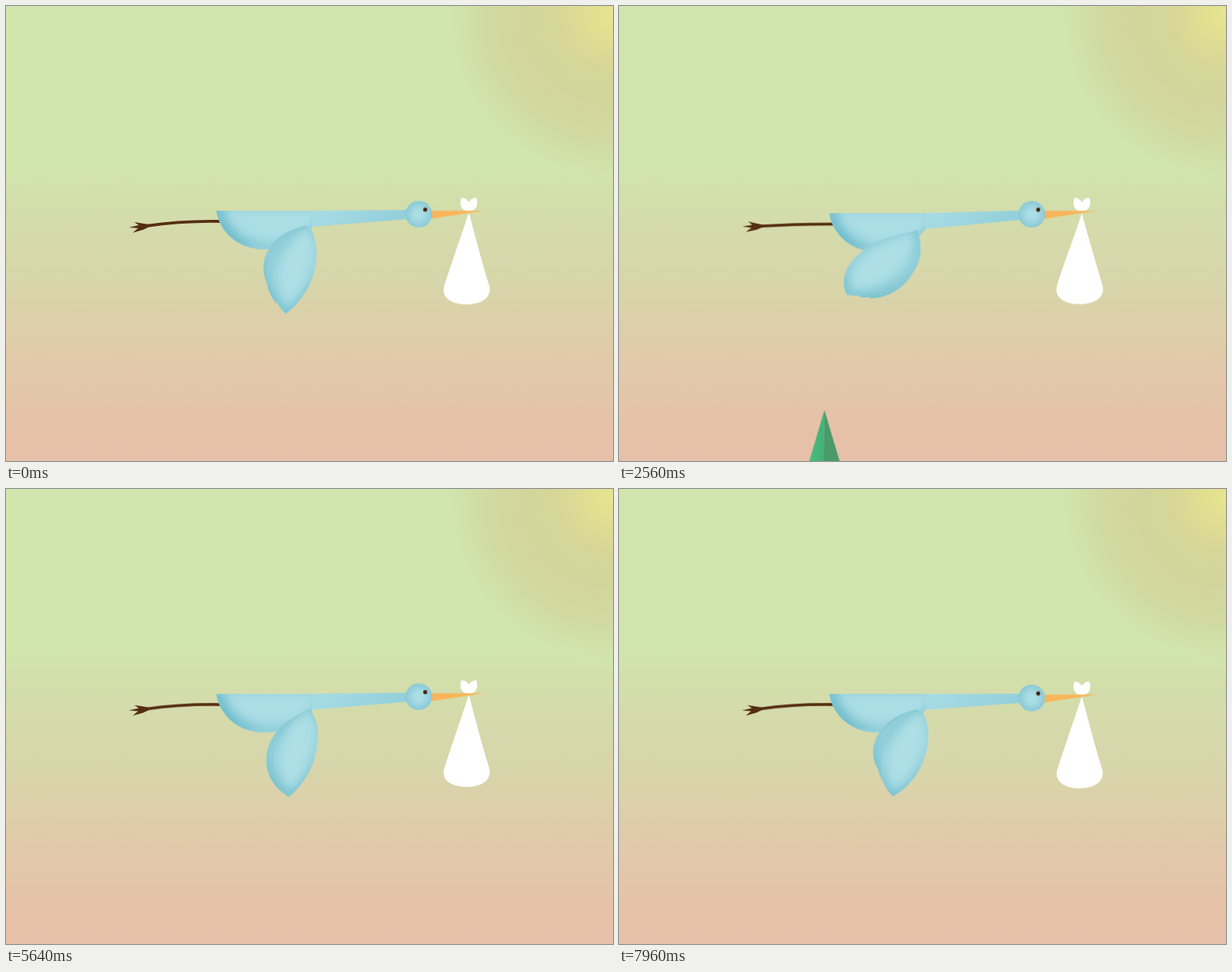
An HTML page that plays this animation: 800x600 px, repeating every 8 s.

```html
<!DOCTYPE html>
<html lang="en">
<head>
<meta charset="utf-8">
<title>Stork</title>
<style>
html, body { margin: 0; width: 100%; height: 100%; overflow: hidden; }
body {
  background:
    radial-gradient(circle at 798px 12px, #e6e58e 0, #dfdc93 40px, #d6d698 72px,
      #d3d59b 110px, #d1daa2 165px, rgba(208,230,172,0) 215px),
    linear-gradient(#d0e6ad 0 35%, #d3deab 43%, #d8d5aa 62%, #e0cba9 76%, #e6c1a8 94%, #e6c0a8);
}
svg { display: block; width: 800px; height: 600px; }

.trees { animation: scroll 8s linear infinite; }
@keyframes scroll { to { transform: translateX(-4368px); } }

/* half a wing beat each way */
.body, .head, .neck, .leg, .foot {
  animation: 400ms cubic-bezier(.37,0,.63,1) infinite alternate;
}
.body { animation-name: bob; }
.head { animation-name: nod; animation-delay: -720ms; }
.neck { animation-name: tilt; animation-delay: -200ms; }
.leg  { animation-name: bend; }
.foot { animation-name: kick; }
@keyframes bob  { to { transform: translateY(9.2px); } }
@keyframes nod  { from { transform: translateY(273.6px); } to { transform: translateY(283.6px); } }
@keyframes tilt { from { transform: skewY(1deg); } to { transform: skewY(-1deg); } }
@keyframes bend {
  from { d: path("M285 284Q232 283 185 290"); }
  to   { d: path("M285 285Q232 286 187 282"); }
}
@keyframes kick { to { transform: translate(2px,-8px) rotate(11deg); } }

.sack { animation: sway 800ms ease-in-out infinite; }
@keyframes sway {
  0%, 10%, 80%, 100% { d: path("M610-2C599 30 588 63 578 93C572 110 588 119 607 119C626 119 642 110 636.5 93C627 63 619 30 610-2Z"); }
  45%, 52% { d: path("M610-1C604 35 576 75 575 95C574 108 587 116 607 116C628 116 641 108 640 95C640 78 617 40 610-1Z"); }
}

.feather { animation: leaf 800ms linear infinite; filter: url(#tipShade); }
@keyframes leaf {
  0%, 10%, 100% { d: path("M13.5-15.5C27-27 47-32 69-30C90-28 113-19 132 0C122 15 102 25 80 24C57 23 33 12 13.5-15.5Z"); }
  36%, 54% { d: path("M13.5-13C40-45 60-48 78-47C108-46 136-28 136-3C136 16 122 22 108 20C85 18 55 10 13.5-13Z"); }
}
.front, .mid, .back { animation: 800ms linear infinite; }
.front { animation-name: front; fill: #aedfe6; }
.mid   { animation-name: mid; fill: #9fd6e0; }
.back  { animation-name: back; fill: #98d2dc; }
@keyframes front {
  0%, 100% { transform: rotate(97.5deg); }
  5%  { transform: rotate(96deg); }
  10% { transform: rotate(96.5deg); }
  18% { transform: rotate(118deg); }
  27% { transform: rotate(170deg); }
  36% { transform: rotate(218deg); }
  39% { transform: rotate(221deg); }
  45% { transform: rotate(203deg); }
  50% { transform: rotate(183deg); }
  60% { transform: rotate(153deg); }
  72% { transform: rotate(126deg); }
  85% { transform: rotate(107deg); }
  95% { transform: rotate(101deg); }
}
@keyframes mid {
  0%, 100% { transform: rotate(104.5deg) scale(.91,.95); }
  5%  { transform: rotate(99deg) scale(.97,1.05); }
  10% { transform: rotate(97deg) scale(.97,1.05); }
  18% { transform: rotate(112deg) scale(.95,1); }
  27% { transform: rotate(160deg) scale(.92,.95); }
  36% { transform: rotate(214deg) scale(.9); }
  40% { transform: rotate(227deg) scale(.9); }
  45% { transform: rotate(214deg) scale(.9); }
  50% { transform: rotate(192deg) scale(.89); }
  60% { transform: rotate(162deg) scale(.88); }
  72% { transform: rotate(134deg) scale(.88); }
  85% { transform: rotate(113deg) scale(.88); }
  95% { transform: rotate(107deg) scale(.9); }
}
@keyframes back {
  0%, 100% { transform: rotate(111deg) scale(.79,.9); }
  5%  { transform: rotate(101deg) scale(.95,1.15); }
  10% { transform: rotate(98deg) scale(.95,1.1); }
  18% { transform: rotate(108deg) scale(.92,1); }
  27% { transform: rotate(150deg) scale(.85,.9); }
  36% { transform: rotate(212deg) scale(.78); }
  41% { transform: rotate(234deg) scale(.78); }
  45% { transform: rotate(226deg) scale(.75); }
  50% { transform: rotate(203deg) scale(.73); }
  60% { transform: rotate(172deg) scale(.74); }
  72% { transform: rotate(143deg) scale(.74); }
  85% { transform: rotate(121deg) scale(.75); }
  95% { transform: rotate(115deg) scale(.79,.85); }
}
</style>
</head>
<body>
<svg viewBox="0 0 800 600">
  <defs>
    <filter id="tipShade" color-interpolation-filters="sRGB">
      <feFlood flood-color="#6fbccb"/>
      <feComposite operator="out" in2="SourceAlpha"/>
      <feGaussianBlur stdDeviation="8"/>
      <feOffset dx="-5" dy="-1"/>
      <feComposite operator="in" in2="SourceAlpha" result="shade"/>
      <feMerge><feMergeNode in="SourceGraphic"/><feMergeNode in="shade"/></feMerge>
    </filter>
    <filter id="bellyShade" color-interpolation-filters="sRGB">
      <feFlood flood-color="#6fbccb"/>
      <feComposite operator="out" in2="SourceAlpha"/>
      <feGaussianBlur stdDeviation="7"/>
      <feOffset dx="8" dy="-6"/>
      <feComposite operator="in" in2="SourceAlpha" result="shade"/>
      <feMerge><feMergeNode in="SourceGraphic"/><feMergeNode in="shade"/></feMerge>
    </filter>
    <linearGradient id="neckFill" x2="1" y2=".15">
      <stop stop-color="#abdde5"/><stop offset="1" stop-color="#92cfdb"/>
    </linearGradient>
    <radialGradient id="headFill">
      <stop offset=".3" stop-color="#abdde5"/><stop offset="1" stop-color="#8acad7"/>
    </radialGradient>
    <linearGradient id="treeFill">
      <stop stop-color="#50c586"/><stop offset="1" stop-color="#42b276"/>
    </linearGradient>
    <g id="tree">
      <path d="M0 0L-36.7 123H-2Z" fill="url(#treeFill)"/>
      <path d="M0 0L-2 123H36.7Z" fill="#4a9a6a"/>
    </g>
  </defs>

  <g class="trees">
    <use href="#tree" x="1022" y="477"/>
    <use href="#tree" x="1669" y="533"/>
    <use href="#tree" x="2878" y="477"/>
    <use href="#tree" x="4101" y="533"/>
  </g>

  <g class="body">
    <path class="leg" d="M285 284Q232 283 185 290" fill="none" stroke="#552d12" stroke-width="3.8"/>
    <g transform="translate(187 290)">
      <path class="foot" d="M1-2L-18-5L-12-1L-25 2L-13 3L-20 9L-6 5L1 1.500Z" fill="#552d12"/>
    </g>
    <g transform="translate(390 270)">
      <path class="neck" d="M2 0L140-1V11L2 22Z" fill="url(#neckFill)"/>
    </g>
    <path d="M277 270C282 300 308 321 340 321C372 321 392 307 404 290.500V270Z" fill="#abdde5" filter="url(#bellyShade)"/>
    <g transform="translate(386 275)">
      <g class="back"><path class="feather"/></g>
      <g class="mid"><path class="feather"/></g>
      <g class="front"><path class="feather"/></g>
    </g>
  </g>

  <g class="head">
    <g fill="#fff">
      <path class="sack"/>
      <path d="M610-16C607-21 603-22 600-21.500C597-13 600-4 610-4C620-4 623-13 620-21.500C617-22 613-21 610-16Z"/>
    </g>
    <path d="M560-4.500H630L560 6Z" fill="#f9b55a"/>
    <circle cx="544" r="17.600" fill="url(#headFill)"/>
    <circle cx="552.500" cy="-6" r="2.700" fill="#4a2810"/>
  </g>
</svg>
</body>
</html>
```
